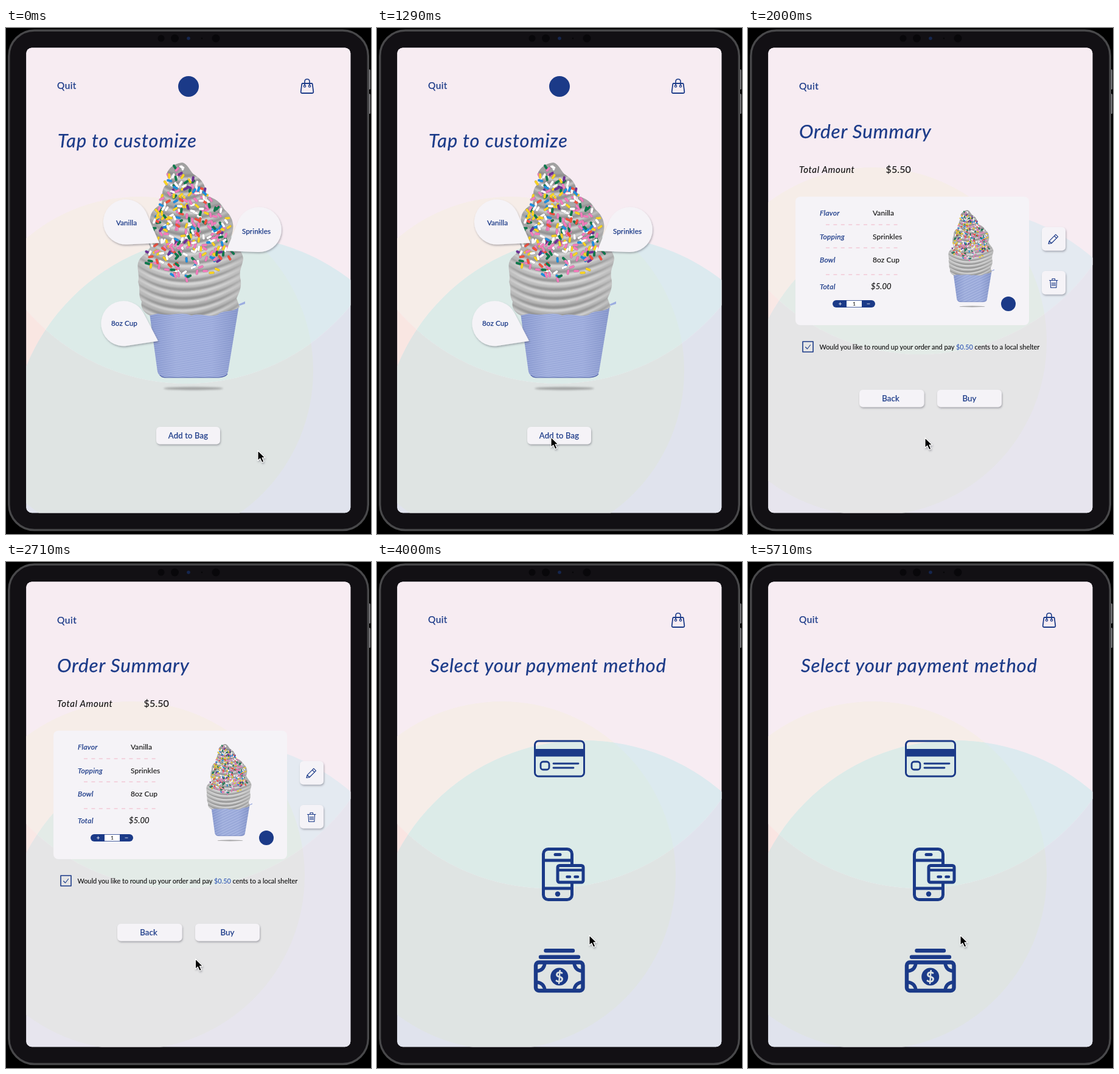
These frames come from a looping animation (600 px wide and 831 px high, 5.85 s). An HTML page:

```html
<!DOCTYPE html>
<html lang="en">
<head>
<meta charset="utf-8">
<title>Order a soft serve</title>
<style>
  html, body { margin: 0; width: 100%; height: 100%; overflow: hidden; background: #000; }
  svg { display: block; width: 100%; height: 100%; }
  text { font-family: Lato, "Open Sans", sans-serif; font-weight: 400; fill: #1b3a88; stroke: #1b3a88; stroke-width: .25; }
  .i { font-style: italic; }
  .k { fill: #111; stroke: #111; stroke-width: .12; }
  .m { text-anchor: middle; }
  .panel { fill: #f5f3f7; filter: url(#drop); }
  .line { fill: none; stroke: #1b3a88; stroke-linecap: round; stroke-linejoin: round; }
  .navy { fill: #1b3a88; }
</style>
</head>
<body>
<svg id="stage" viewBox="0 0 600 831"></svg>
<script>
const LOOP = 5850, FPS = 7;

function random(seed) {
  return () => {
    seed = (seed + 0x6d2b79f5) | 0;
    let t = Math.imul(seed ^ (seed >>> 15), 1 | seed);
    t = (t + Math.imul(t ^ (t >>> 7), 61 | t)) ^ t;
    return ((t ^ (t >>> 14)) >>> 0) / 4294967296;
  };
}

const text = (x, y, size, str, cls = '', gap = .1) =>
  `<text x="${x}" y="${y}" font-size="${size}" class="${cls}" letter-spacing="${gap}">${str}</text>`;
const rect = (x, y, w, h, r, attrs) =>
  `<rect x="${x}" y="${y}" width="${w}" height="${h}" rx="${r}" ${attrs}/>`;
const circle = (x, y, r, attrs) => `<circle cx="${x}" cy="${y}" r="${r}" ${attrs}/>`;
const line = (d, width, attrs = '') => `<path class="line" d="${d}" stroke-width="${width}" ${attrs}/>`;
const panel = (x, y, w, h, r = 6) => rect(x, y, w, h, r, 'class="panel"');

// Three overlapping circles, one flat colour for each overlap.
function backdrop(id, dx, dy, c) {
  const warm = fill => circle(205, 515, 286, `fill="${fill}"`);
  const cool = fill => circle(340, 640, 347, `fill="${fill}"`);
  const both = fill => `<g clip-path="url(#cool${id})">${warm(fill)}</g>`;
  const big = 'x="-100" y="-100" width="800" height="1000"';
  return `
    <clipPath id="cool${id}">${cool('#000')}</clipPath>
    <clipPath id="pink${id}">${circle(283, 189, 347, '')}</clipPath>
    <g transform="translate(${dx} ${dy})">
      <rect ${big} fill="${c.cool}"/>${warm(c.warm)}${cool(c.cool)}${both(c.mix)}
      <g clip-path="url(#pink${id})">
        <rect ${big} fill="#f7ecf2"/>${warm('#f6ede8')}${cool(c.pinkCool)}${both(c.pinkMix)}
      </g>
    </g>`;
}

// Tapered ridges that fan out across each tier of the swirl.
function folds() {
  let out = '';
  const tiers = [[226, 13, 4, 252, 335], [272, 14, 6, 232, 376], [352, 15, 8, 206, 398]];
  for (const [top, step, n, x0, x1] of tiers) {
    const w = x1 - x0;
    for (let i = 0; i < n; i++) {
      const l = top + i * step, r = top + 6 + i * step * .8;
      const ridge = (k, fat, fill, alpha) => {
        const a = `${x0 + w * .25} `, b = `${x0 + w * .62} `;
        return `<path d="M${x0} ${l + k}C${a}${l + w * .2 + k} ${b}${l + w * .22 + k} ${x1} ${r + k}
          C${b}${l + w * .22 + k + fat} ${a}${l + w * .2 + k + fat} ${x0} ${l + k}Z" fill="${fill}" opacity="${alpha}"/>`;
      };
      out += ridge(0, 7, '#868686', .65) + ridge(6, 6, '#e2e2e2', .7);
    }
  }
  return `<g filter="url(#soft)">${out}</g>`;
}

function sprinkles() {
  const rnd = random(4127);
  const colors = ['#f27cbc', '#f27cbc', '#f27cbc', '#f27cbc', '#fff', '#fff', '#fff', '#fff',
    '#f9d423', '#f9d423', '#f9d423', '#1c8fe0', '#0b7a4b', '#0b7a4b', '#6b2f96', '#f4503c'];
  // Left and right limits at a few heights.
  const edge = [[226, 272, 292], [240, 264, 304], [265, 261, 326], [290, 250, 348], [320, 240, 370],
    [350, 233, 370], [372, 228, 376], [395, 234, 354], [414, 284, 318]];
  let out = '';
  for (let n = 0; n < 350;) {
    const y = 227 + rnd() * 187, x = 226 + rnd() * 150, a = rnd() * Math.PI, c = colors[rnd() * 16 | 0];
    const j = edge.findIndex(e => e[0] > y), [p, q] = [edge[j - 1], edge[j]];
    const k = (y - p[0]) / (q[0] - p[0]);
    if (x < p[1] + (q[1] - p[1]) * k || x > p[2] + (q[2] - p[2]) * k) continue;
    n++;
    if (y > 385 && rnd() < .4) continue;
    const dx = Math.cos(a) * 2.6, dy = Math.sin(a) * 2.6;
    const d = `M${(x - dx).toFixed(1)} ${(y - dy).toFixed(1)}l${(dx * 2).toFixed(1)} ${(dy * 2).toFixed(1)}`;
    out += `<path d="${d}" stroke="#5a4a58" stroke-opacity=".4" stroke-width="4.5"/><path d="${d}" stroke="${c}" stroke-width="3.8"/>`;
  }
  return `<g stroke-linecap="round">${out}</g>`;
}

const SWIRL = `M264 241C266 230 278 222 290 221C298 223 301 232 308 240C320 247 330 257 328 276
  C344 278 354 288 359 298C371 308 378 322 370 343C373 355 388 363 390 378C389 390 383 397 385 410
  C388 422 385 432 379 444L384 458C372 468 357 462 348 471C332 476 320 467 305 472C288 465 270 474 250 469
  L236 472C225 466 221 459 223 449C216 438 222 429 217 417C220 407 215 397 217 386C220 374 231 372 237 360
  C230 345 232 330 237 318C235 303 246 294 256 289C258 277 254 262 265 257L273 246Z`;
const CUP = 'M235 461L249 564Q251 573 262 574H352Q363 573 365 564L383 455Z';

const defs = `<defs>
  <filter id="drop" x="-20%" y="-30%" width="140%" height="170%">
    <feDropShadow dx="1" dy="2" stdDeviation="1.5" flood-color="#445" flood-opacity=".4"/></filter>
  <filter id="soft"><feGaussianBlur stdDeviation="1.1"/></filter>
  <filter id="haze" x="-20%" y="-200%" width="140%" height="500%"><feGaussianBlur stdDeviation="1.6"/></filter>
  <linearGradient id="cupFill">
    <stop offset="0" stop-color="#8a9ad0"/><stop offset=".3" stop-color="#a8b6e2"/>
    <stop offset=".7" stop-color="#a6b4e2"/><stop offset="1" stop-color="#8797cb"/>
  </linearGradient>
  <linearGradient id="cream" x2="0" y2="1">
    <stop offset="0" stop-color="#a0a0a0"/><stop offset=".5" stop-color="#b0b0b0"/>
    <stop offset=".75" stop-color="#c0c0c0"/><stop offset="1" stop-color="#b0b0b0"/>
  </linearGradient>
  <pattern id="weave" width="3" height="3" patternUnits="userSpaceOnUse" patternTransform="rotate(8)">
    <path d="M0 1H3" stroke="#5f72b4" opacity=".45"/><path d="M0 2.500H3" stroke="#c6d0f2" opacity=".35"/></pattern>
  <clipPath id="swirlClip"><path d="${SWIRL}"/></clipPath>
  <clipPath id="screen">${rect(33.3, 32.6, 533, 763.6, 9, '')}</clipPath>
  <g id="treat">
    <ellipse cx="308" cy="592" rx="49" ry="2.4" fill="#777" opacity=".6" filter="url(#haze)"/>
    <path d="${CUP}" fill="url(#cupFill)"/><path d="${CUP}" fill="url(#weave)"/>
    <path d="M253 570Q256 574 264 574H350Q361 573 364 568" fill="none" stroke="#4d5fa6" stroke-width="1.2"/>
    <path d="M382 454L393 449V453L384 456Z" fill="#9cade0"/>
    <path d="${SWIRL}" fill="url(#cream)"/>
    <g clip-path="url(#swirlClip)">${folds()}</g>
    ${sprinkles()}
  </g>
  <g id="bag">
    <path class="line" d="M487.500 91H502.500Q503.500 91 503.700 92L505.300 104.500Q505.400 107 503 107H487Q484.500 107 484.700 104.500L486.300 92Q486.500 91 487.500 91Z" stroke-width="1.8"/>
    <path class="line" d="M491 94V88Q491 84 495 84T499 88V94" stroke-width="1.6"/>
    ${circle(491, 95.5, 1.7, 'class="line" stroke-width="1.2"')}${circle(499, 95.5, 1.7, 'class="line" stroke-width="1.2"')}
  </g>
</defs>`;

const bubble = (d, x, y, label) => `<path class="panel" d="${d}"/>` + text(x, y, 11.7, label, 'm');

const customize = () => backdrop('A', 14, 48,
  { cool: '#e0e3ed', warm: '#f9e6e2', mix: '#dfe4e3', pinkCool: '#dceaef', pinkMix: '#dcebe8' }) +
  text(84, 100, 15.3, 'Quit', '', .5) + circle(300, 96, 17, 'class="navy"') + '<use href="#bag"/>' +
  text(85, 195.500, 30.5, 'Tap to customize', 'i', 1.05) + '<use href="#treat"/>' +
  bubble('M252 353L199 355.500A37 37 0 1 1 230 302Z', 198, 324, 'Vanilla') +
  bubble('M362 366L414 368A37 37 0 1 0 383 314Z', 411.500, 338, 'Sprinkles') +
  bubble('M250 514L198 522A37 37 0 1 1 226 468Z', 194.500, 489, '8oz Cup') +
  panel(247, 655, 105, 28.500) + text(299.5, 674, 13, 'Add to Bag', 'm', .2);

function summary() {
  const rows = [['Flavor', 'Vanilla', 308], ['Topping', 'Sprinkles', 347], ['Bowl', '8oz Cup', 385]];
  return backdrop('B', 0, 0,
    { cool: '#e7e5ee', warm: '#f9e8e5', mix: '#e5e5e6', pinkCool: '#e4eaf1', pinkMix: '#e3ebe7' }) +
    text(84, 101, 15.500, 'Quit', '', .5) + text(84, 181, 31.5, 'Order Summary', 'i', .85) +
    text(84, 238, 15, 'Total Amount', 'i k', .65) + text(226.5, 238, 16, '$5.50', 'k') +
    rect(78, 277, 384, 211, 8, 'fill="#f5f3f7"') +
    rows.map(([a, b, y]) => text(118, y, 12, a, 'i', .25) + text(205, y, 12, b, 'k')).join('') +
    text(118, 429, 12, 'Total', 'i', .25) + text(202, 429, 13, '$5.00', 'i k') +
    [323, 361, 405].map(y => `<path d="M128 ${y}H246" stroke="#f2b3c6" stroke-width="1.2" stroke-dasharray="6 6.400"/>`).join('') +
    rect(139, 447, 70, 12, 6, 'class="navy"') + rect(162, 447.800, 25, 10.400, 0, 'fill="#fff"') +
    text(174.5, 456, 8, '1', 'm k') +
    '<path d="M149 453H154M151.500 450.500V455.500M195.500 453H200.500" stroke="#fff" stroke-width=".8"/>' +
    '<use href="#treat" transform="translate(237 204.600) scale(.427)"/>' + circle(428, 453, 12, 'class="navy"') +
    panel(483, 327, 39, 38.500) + panel(483, 399, 39, 38.500) +
    line('M494 354.500L495.200 349.800L505.800 339.200L509.500 342.900L498.900 353.500ZM503.500 341.500L507.200 345.200M495.200 349.800L498.900 353.500', 1.2) +
    line('M495.500 414.500H509M500 414V411.800H504.500V414M497 415L497.700 426.500H506.800L507.500 415M500 418V423.500M502.300 418V423.500M504.600 418V423.500', 1.1) +
    rect(90, 515, 17, 17, 0, 'class="line" stroke-width="1.6"') + line('M94.500 524L97.500 527L102.500 520.500', 1.1) +
    text(117.500, 528, 10.9, 'Would you like to round up your order and pay <tspan fill="#1f48b0" stroke="none">$0.50</tspan> cents to a local shelter', 'k', 0) +
    panel(183, 594, 106.500, 28.500) + text(234.5, 613, 13.3, 'Back', 'm') +
    panel(311, 594, 106, 28.500) + text(364, 613, 13.3, 'Buy', 'm');
}

const payment = () => backdrop('C', 0, 0,
  { cool: '#e0e3ed', warm: '#fae5e2', mix: '#dfe4e3', pinkCool: '#dceaef', pinkMix: '#dcebe8' }) +
  text(84, 100, 15.3, 'Quit', '', .5) + '<use href="#bag"/>' +
  text(87, 181, 31, 'Select your payment method', 'i', .8) +
  rect(259.500, 294, 81, 58, 6, 'class="line" stroke-width="3"') + rect(259, 307, 82, 12.500, 0, 'class="navy"') +
  rect(269, 328, 14, 13, 4, 'class="line" stroke-width="2.8"') + line('M290 331H331M290 338H323', 2.8) +
  rect(273.500, 471.500, 47, 83, 8, 'class="line" stroke-width="5"') +
  line('M274 490H320M274 536H320M293 480.500H301', 5) + circle(297, 545.300, 4.2, 'class="navy"') +
  rect(297, 498.500, 42, 27.500, 3, 'fill="#dcebe8" stroke="#1b3a88" stroke-width="5"') +
  line('M298 506H338', 4.5) + line('M312.500 517H317M325.500 517H330', 4.500) +
  line('M277.500 638.300H322M269 648.700H331', 6.4) +
  rect(261, 657.500, 77.500, 46.500, 5, 'class="line" stroke-width="6.4"') +
  line('M276 658Q275 671 262 672M324 658Q325 671 338 672M276 704Q275 691 262 690M324 704Q325 691 338 690', 5.5) +
  circle(299.700, 681, 14.5, 'class="navy"') +
  '<text x="299.700" y="689.500" font-size="24" class="m" style="fill:#dfe4e3;stroke:#dfe4e3;stroke-width:1">$</text>';

const bezel = '<rect width="600" height="831" fill="#000"/>' +
  rect(595, 68, 4, 33, 1.500, 'fill="#77777a"') + rect(595, 108, 4, 33, 1.500, 'fill="#77777a"') +
  rect(4.800, 4, 590.500, 820.500, 42, 'fill="#121014" stroke="#48484a" stroke-width="3.4"') +
  [[255, 5.5], [277.5, 6.5], [322, 1.2], [345, 6.5]].map(([x, r]) => circle(x, 17, r, 'fill="#08070a"')).join('') +
  circle(300, 17, 2.8, 'fill="#15264f"');

const scenes = [customize, summary, payment];
document.getElementById('stage').innerHTML = defs + bezel +
  `<g clip-path="url(#screen)">${scenes.map((s, i) => `<g id="scene${i}">${s()}</g>`).join('')}</g>` +
  `<path id="cursor" d="M0 0V16.500L3.800 13L6.800 19.500L9.800 18.200L7 11.800H12Z" fill="#000" stroke="#fff"
    stroke-width="1.1" stroke-linejoin="round" filter="url(#drop)"/>`;

const views = scenes.map((_, i) => document.getElementById('scene' + i));
const cursor = document.getElementById('cursor');

// Step, x, y
const track = [[0, 414, 694], [4, 264, 663.5], [9, 286, 672], [12, 291, 673], [17, 291, 673], [22, 349, 613], [41, 349, 613]];

function cursorAt(step) {
  const i = track.findIndex(k => k[0] > step);
  const [a, b] = [track[i - 1], track[i]];
  const u = (step - a[0]) / (b[0] - a[0]), e = u * u * (3 - 2 * u);
  return [a[1] + (b[1] - a[1]) * e, a[2] + (b[2] - a[2]) * e];
}

function draw(ms) {
  const step = Math.min(40, Math.floor((ms + 5) * FPS / 1000));
  const shown = step < 14 ? 0 : step < 28 ? 1 : 2;
  views.forEach((v, i) => v.setAttribute('display', i === shown ? 'inline' : 'none'));
  cursor.setAttribute('transform', `translate(${cursorAt(step)})`);
}

let start;
function tick(now) {
  start ??= now;
  draw((now - start) % LOOP);
  requestAnimationFrame(tick);
}
draw(0);
requestAnimationFrame(tick);
</script>
</body>
</html>
```
